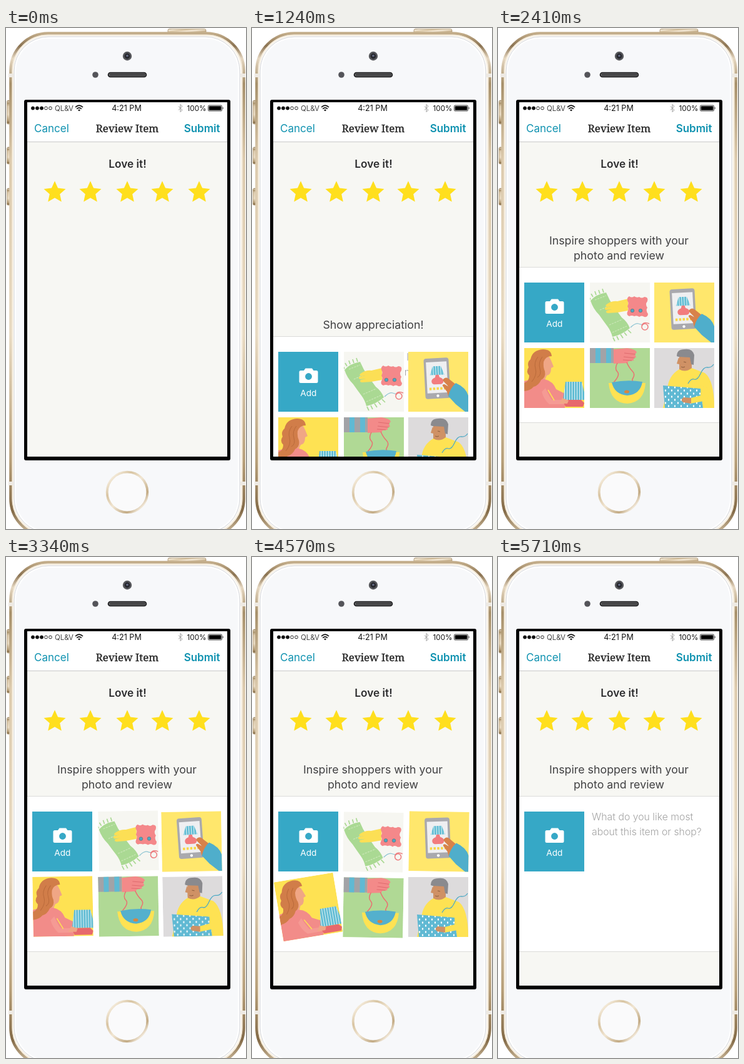
Write an HTML page that moves like this. It is 384 px wide and 803 px high and loops after 8830 ms.

```html
<!DOCTYPE html>
<html lang="en">
<head>
<meta charset="utf-8">
<title>Review Item</title>
<style>
html, body { margin: 0; width: 100%; height: 100%; overflow: hidden; background: #fff; }
svg { display: block; width: 384px; height: 803px; }
text { font-family: Inter, Roboto, sans-serif; }
.mid { text-anchor: middle; }
.title { font-size: 17.8px; fill: #404042; text-anchor: middle; }
.hint { font-size: 15.8px; font-weight: 300; fill: #a3a3a3; }
.status { font-size: 12px; fill: #111; }
.nav { font-size: 17px; fill: #0f92b0; }
</style>
</head>
<body>
<svg viewBox="0 0 384 803">
  <defs>
    <linearGradient id="gold" x1="0" y1="0" x2="1" y2="1">
      <stop offset="0" stop-color="#a89070"/><stop offset=".12" stop-color="#f5ecdc"/>
      <stop offset=".3" stop-color="#d8c4a2"/><stop offset=".5" stop-color="#f1e6d3"/>
      <stop offset=".75" stop-color="#c2aa84"/><stop offset=".88" stop-color="#f7efe2"/>
      <stop offset="1" stop-color="#957c56"/>
    </linearGradient>
    <linearGradient id="rim" x1="0" y1="0" x2="0" y2="1">
      <stop offset="0" stop-color="#c3ad8a"/><stop offset=".025" stop-color="#8b7352"/>
      <stop offset=".05" stop-color="#e6d8c2"/><stop offset=".1" stop-color="#a68f69"/>
      <stop offset=".25" stop-color="#dccaad"/><stop offset=".6" stop-color="#e8dac2"/>
      <stop offset=".85" stop-color="#b69e78"/><stop offset=".95" stop-color="#846b48"/>
      <stop offset="1" stop-color="#d8c6a8"/>
    </linearGradient>
    <clipPath id="screen"><rect x="34" y="119" width="320" height="568"/></clipPath>
    <clipPath id="square"><rect width="96" height="96"/></clipPath>
    <pattern id="stripes" width="4" height="8" patternUnits="userSpaceOnUse">
      <rect width="4" height="8" fill="#60bcd4"/><rect width="1.1" height="8" fill="#dff1f3"/>
    </pattern>
    <pattern id="dots" width="10" height="10" patternUnits="userSpaceOnUse">
      <rect width="10" height="10" fill="#60b9d3"/>
      <ellipse cx="3" cy="3" rx="1.2" ry="1.8" fill="#fff"/><ellipse cx="8" cy="8" rx="1.2" ry="1.8" fill="#fff"/>
    </pattern>
  </defs>

  <!-- phone body -->
  <rect x="259" y="1.5" width="61" height="8" rx="2.5" fill="url(#gold)" stroke="#a8916c" stroke-width=".8"/>
  <g fill="url(#rim)" stroke="#a8916c" stroke-width=".7">
    <rect x="1.5" y="116" width="6" height="38" rx="2"/>
    <rect x="1.5" y="191" width="6" height="27" rx="2"/>
    <rect x="1.5" y="257" width="6" height="27" rx="2"/>
  </g>
  <rect x="7.5" y="8.500" width="373" height="806" rx="60" fill="#fcfaf6" stroke="url(#rim)" stroke-width="4.600"/>
  <rect x="10.500" y="11.500" width="367" height="800" rx="57" fill="none" stroke="#f5ecdc" stroke-width="2"/>
  <rect x="13" y="14" width="361" height="795" rx="55" fill="#f7f8fa" stroke="#d5d7dc"/>
  <rect x="15" y="16" width="357" height="791" rx="53" fill="none" stroke="#fff" stroke-width="2"/>
  <path d="M4 76h8M375 76h8M4 730h8M375 730h8" stroke="#eeeae3" stroke-width="6"/>
  <circle cx="194" cy="45" r="7.2" fill="#55565a"/>
  <circle cx="194" cy="45" r="4.4" fill="#26272d"/>
  <circle cx="194" cy="44.5" r="1.8" fill="#646a83"/>
  <circle cx="143" cy="75" r="4.8" fill="#545459"/>
  <rect x="163.5" y="71.5" width="61" height="7" rx="3.5" fill="#5b5b5c" stroke="#1d1d1f" stroke-width="1.6"/>
  <path d="M167 75h55" stroke="#2b2b2d" stroke-width="3" stroke-dasharray="1 1"/>
  <circle cx="194" cy="744" r="32.3" fill="#fafafb" stroke="url(#gold)" stroke-width="3.8"/>
  <rect x="29" y="115" width="330" height="578" rx="3" fill="#000"/>

  <!-- screen -->
  <g clip-path="url(#screen)">
    <rect x="34" y="119" width="320" height="568" fill="#f7f7f3"/>
    <rect x="34" y="119" width="320" height="63" fill="#fff"/>
    <path d="M34 182.500h320" stroke="#c9c9c9"/>
    <g stroke="#111" fill="#111" stroke-width=".9">
      <circle cx="43" cy="128.500" r="2.6"/><circle cx="50" cy="128.500" r="2.6"/><circle cx="57" cy="128.500" r="2.6"/>
      <circle cx="64" cy="128.500" r="2.4" fill="none"/><circle cx="71" cy="128.500" r="2.4" fill="none"/>
    </g>
    <text class="status" x="78" y="133" style="font-size:11.5px;fill:#444">QL&amp;V</text>
    <g fill="none" stroke="#111" stroke-width="1.7">
      <path d="M111 127q6-5.600 12 0M113.200 129.600q3.800-3.400 7.600 0"/>
      <path d="M115 131.200q2-1.500 4 0l-2 2.200z" fill="#111" stroke="none"/>
    </g>
    <text class="status mid" x="193" y="133" style="font-size:12.6px">4:21 PM</text>
    <path d="M276 125.500l6 6-3 3v-12l3 3-6 6" fill="none" stroke="#999" stroke-width="1"/>
    <text class="status" x="289.500" y="133" style="font-size:11.700px">100%</text>
    <rect x="323.500" y="124" width="22" height="9" rx="1.500" fill="#fff" stroke="#111" stroke-width=".8"/>
    <rect x="324.700" y="125.200" width="19.600" height="6.600" rx=".6" fill="#000"/>
    <path d="M346.800 126.800q2 1.700 0 3.400z" fill="#111"/>
    <text class="nav" x="45" y="167">Cancel</text>
    <text class="mid" x="194" y="167" style="font:500 16.900px 'Noto Serif',serif;fill:#262626;stroke:#262626;stroke-width:.4">Review Item</text>
    <text class="nav" x="342.500" y="167" text-anchor="end" style="font-weight:600">Submit</text>
    <text class="mid" x="194.500" y="224" style="font-size:17.300px;font-weight:600;fill:#2d2d2f">Love it!</text>
    <g id="stars" fill="#ffdf1d"></g>

    <g id="sheet">
      <text class="title" id="praise" x="194" y="371">Show appreciation!</text>
      <g id="inspire">
        <text class="title" x="193.500" y="347">Inspire shoppers with your</text>
        <text class="title" x="193.500" y="371">photo and review</text>
      </g>
      <rect x="33" y="383.500" width="322" height="249" fill="#fff" stroke="#dcdcda"/>
      <g id="hint">
        <text class="hint" x="150" y="422">What do you like most</text>
        <text class="hint" x="150" y="446">about this item or shop?</text>
      </g>
      <rect x="42" y="408" width="96" height="96" fill="#36a8c6"/>
      <path d="M78 438h5l2.500-3.500h10.500l2.500 3.500h4.500q2.500 0 2.500 2.500v15q0 2.500-2.500 2.500h-25q-2.500 0-2.500-2.500v-15q0-2.500 2.500-2.500z" fill="#fff"/>
      <circle cx="90.500" cy="447.500" r="5.400" fill="#36a8c6"/>
      <text class="mid" x="90.300" y="479" style="font-size:13.700px;fill:#fff">Add</text>

      <g class="tile"><g clip-path="url(#square)">
        <rect width="96" height="96" fill="#f6f6f1"/>
        <path d="M1 29q8-10 25-13 5 12 12 22t13 18q9 7 13 17-13 11-28 14-2-9-8-17T15 52Q5 42 1 29z" fill="#aad993"/>
        <path d="M1 27l-3-5M5 23l-3-5M10 20l-2-6M16 18l-2-6M22 16l-2-6M37 88l3 6M43 86l3 6M49 83l4 6M55 80l4 5M61 76l5 5" stroke="#aad993" stroke-width="1.700"/>
        <path d="M8 28l18-7M16 44l20-9M31 68l21-9M36 80l23-10" stroke="#cbe7b8" stroke-width="1.200" stroke-dasharray="3 1.500"/>
        <path d="M28 34q8-5 16-4l17-4v19l-17 3-15 1q-5-1-2-4l8-2-9 1q-4-2-1-4l9-2-7 1q-4-2 1-5z" fill="#fcdf55"/>
        <path d="M63 22q4 3 8 0 4 3 8 1 4 3 8 0 7 0 5 7-4 5 0 10-3 5 1 10 0 6-6 5-4-3-8 0-4-3-8-1-4-2-8 0-5-2-3-7 3-5 0-9 3-5 0-9-1-5 3-7z" fill="#f4888a"/>
        <circle cx="68" cy="45" r="2.800" fill="#4ba9c4" stroke="#6c6c70" stroke-width=".7"/>
        <circle cx="81" cy="45" r="2.800" fill="#4ba9c4" stroke="#6c6c70" stroke-width=".7"/>
        <path d="M65 72q8-8 13-6t8 1" fill="none" stroke="#8fc5d3" stroke-width="1.300"/>
        <circle cx="88" cy="71" r="5" fill="none" stroke="#ee7a7c" stroke-width="1.500"/>
        <path d="M83 69q3-7 12-3" fill="none" stroke="#ee7a7c" stroke-width="1.500"/>
      </g></g>

      <g class="tile"><g clip-path="url(#square)">
        <rect width="96" height="96" fill="#ffe76c"/>
        <g transform="rotate(-3 46 42)">
          <rect x="26" y="10" width="40" height="65" rx="4" fill="#a9a9ae"/>
          <rect x="29.500" y="16" width="33" height="50" fill="#efeff1"/>
          <path d="M40 23h13l5 14H35z" fill="url(#stripes)"/>
          <path d="M44 37h5l1 4q6 2 6 6 0 4-4 5H41q-4-1-4-5t6-6z" fill="#f27c7e"/>
          <path d="M33 59h27" stroke="#f9d645" stroke-width="4" stroke-dasharray="3.500 2.300"/>
          <circle cx="46" cy="70.500" r="2.200" fill="#fff"/>
        </g>
        <path d="M57 43q4-4 10 2l10 8 4 14-9 9-8-5-2-7-6-8q-3-4 2-4l7 4-8-8q-3-3 0-5z" fill="#d8824a"/>
        <path d="M76 50q16 7 20 20v26h-5L76 84l-12-13q3-13 12-21z" fill="#4faecb"/>
      </g></g>

      <g class="tile"><g clip-path="url(#square)">
        <rect width="96" height="96" fill="#fee253"/>
        <path d="M29 10q12 2 14 10l4 10-4 2q0 11-7 12l-5 11H20z" fill="#f0a685"/>
        <path d="M0 53l19-5 14 2q13 3 18 16l14 7v23H0z" fill="#f28c89"/>
        <path d="M10 18q3-15 20-16 13 0 14 11-10 0-13 9-1 9 2 15 2 10-6 14-4 9-12 11-5 6-15 7V56q8-3 8-12-6-6-1-13-3-8 3-13z" fill="#d17d49"/>
        <path d="M22 14q-7 9-4 19t-6 21M29 14q-7 9-4 19t-4 14" fill="none" stroke="#ba6a3b" stroke-width="1"/>
        <path d="M34 64q6 14 10 19h24v7H40Q31 82 28 70z" fill="#f59a94"/>
        <path d="M66 54h26l7 29H62z" fill="url(#stripes)"/>
        <path d="M68 83h23l5 5-2 6H66l-3-6z" fill="#e7696c"/>
        <path d="M38 67l10 17" stroke="#fee253" stroke-width="1.500"/>
        <path d="M61 80l10 4-2 5H56z" fill="#f0a685"/>
      </g></g>

      <g class="tile"><g clip-path="url(#square)">
        <rect width="96" height="96" fill="#b0d995"/>
        <path d="M0 0h38v24H0z" fill="#a2a3a7"/>
        <path d="M9 0h8v24H9zM26 0h8v24h-8z" fill="#60b9d3"/>
        <path d="M38 2l22-2q14 2 15 7l-3 3 2 5-4 1v4l-8 1-2 3-22 1z" fill="#f38a89"/>
        <path d="M55 8l18 2M54 14l18 2M53 19l14 1" stroke="#df6b6e" stroke-width="1"/>
        <path d="M44 24q-5 9 0 14t-6 17M59 23q4 9 9 14t1 11 6 9" fill="none" stroke="#ea7070" stroke-width="1.500"/>
        <path d="M30 56q3 32 30 33 27-2 29-33z" fill="#fee253"/>
        <path d="M35 55q25-5 49-1-3 20-24 22-21-2-25-21z" fill="#54b0cd"/>
        <ellipse cx="59" cy="70" rx="4" ry="2.500" fill="#d7853f"/>
      </g></g>

      <g class="tile"><g clip-path="url(#square)">
        <rect width="96" height="96" fill="#dddbdc"/>
        <path d="M40 12h20v28H40z" fill="#cf9165"/>
        <path d="M36 13q0-11 12-11 13-2 16 9l-1 16-4-1-2-11-18-1z" fill="#8a8a8e"/>
        <path d="M39 15l-3 10 4 1v6q2 4 9 2z" fill="#cf9165"/>
        <path d="M40 34q10 6 20-2l21 8q15 12 15 56H14l7-31q2-21 19-31z" fill="#fee253"/>
        <path d="M14 60l60 5 4 31H17z" fill="url(#dots)"/>
        <path d="M75 60l15 6-6 18-26 5-3-8 19-5z" fill="#fee253"/>
        <path d="M59 80l-12-1q-6 4-1 8l13 2z" fill="#cf9165"/>
        <path d="M54 57q5-9 10-7t10-9 11-10 10-5" fill="none" stroke="#4da9c5" stroke-width="1.300"/>
        <path d="M47 22l4 1M43 30q3 2 6 0" stroke="#8c5d3c" stroke-width="1" fill="none"/>
      </g></g>
    </g>
  </g>
</svg>
<script>
const LOOP = 8830, STEP = 30, TIP = 90, FALL = 190;
const $ = id => document.getElementById(id);
const clamp = v => Math.max(0, Math.min(1, v));
const ramp = (t, from, to) => clamp((t - from) / (to - from));
const ease = u => u * u * (3 - 2 * u);

// home corner, shake direction, moment it tips over, tip direction
const tiles = [
  { x: 147, y: 408, dx: 1, dy: -1, drop: 4800, lean: -1 },
  { x: 250, y: 408, dx: -1, dy: 0, drop: 4730, lean: 1 },
  { x: 42, y: 513, dx: 1, dy: -1, drop: 4480, lean: -1 },
  { x: 147, y: 513, dx: 1, dy: -1, drop: 4660, lean: 1 },
  { x: 250, y: 513, dx: 1, dy: -1, drop: 4570, lean: 1 }
];
const nodes = document.querySelectorAll('.tile');

function starPath(cx, cy, r) {
  const pts = [];
  for (let i = 0; i < 10; i++) {
    const a = i * Math.PI / 5, d = i % 2 ? r * 0.47 : r;
    pts.push((cx + d * Math.sin(a)).toFixed(1) + ' ' + (cy - d * Math.cos(a)).toFixed(1));
  }
  return `<path d="M${pts.join('L')}z"/>`;
}
$('stars').innerHTML = [78, 135, 194, 250, 309].map(x => starPath(x, 263.6, 18.4)).join('');

function placeTile(tile, node, t) {
  let { x, y } = tile, angle = 0;
  if (t >= 3160 && t < tile.drop) {
    const k = Math.round((t - 3940) / STEP), side = k % 2 ? -1 : 1;
    x += side * tile.dx;
    y += side * tile.dy;
    angle = Math.sin(k * Math.PI / 8);
  } else if (t >= tile.drop) {
    const fall = ramp(t, tile.drop + TIP, tile.drop + TIP + FALL);
    angle = tile.lean * (9.5 * ramp(t, tile.drop, tile.drop + TIP) + 2.5 * fall);
    y += (705 - tile.y) * fall * fall;
  }
  node.setAttribute('transform', `translate(${x} ${y}) rotate(${angle} 48 48)`);
  node.style.display = t < tile.drop + TIP + FALL ? '' : 'none';
}

function draw(time) {
  const t = 1000 + Math.floor((time - 1000) / STEP) * STEP;
  $('sheet').style.display = t < 1000 ? 'none' : '';
  if (t < 1000) return;
  const lift = 315 * (1 - ease(ramp(t, 970, 1420)));
  const swap = ramp(t, 1870, 2320);
  $('sheet').setAttribute('transform', `translate(0 ${Math.round(lift)})`);
  $('praise').style.opacity = ramp(t, 970, 1090) * (1 - swap);
  $('inspire').style.opacity = swap;
  $('hint').style.opacity = t < 3000 ? 1 - ramp(t, 1450, 1870) : ramp(t, 5290, 5710);
  tiles.forEach((tile, i) => placeTile(tile, nodes[i], t));
}

const start = performance.now();
function tick() {
  draw((performance.now() - start) % LOOP);
  requestAnimationFrame(tick);
}
tick();
</script>
</body>
</html>
```
